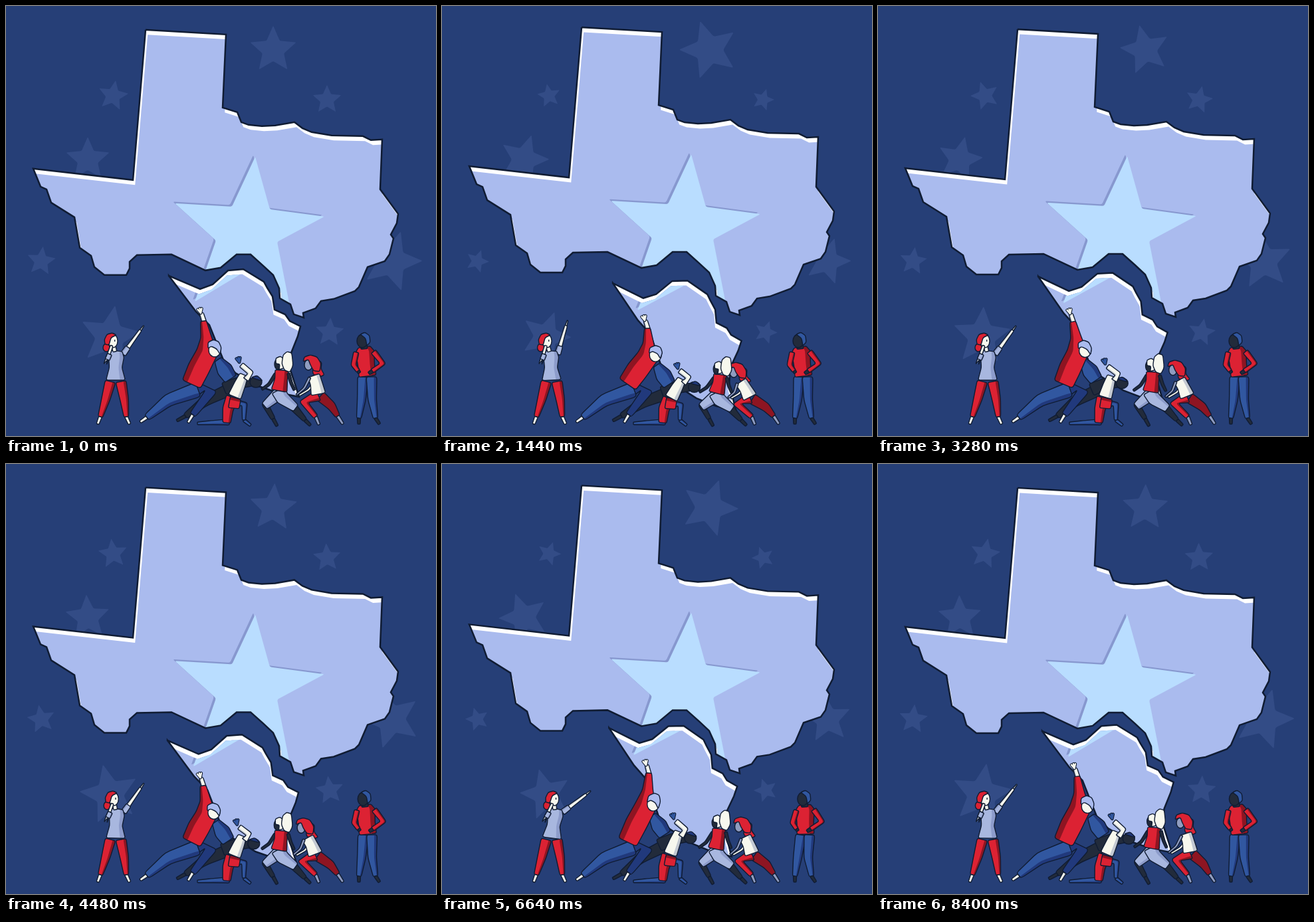
Animation, 647 px wide and 647 px high, one loop 8480 ms. Source, as an HTML page with a canvas:

```html
<!DOCTYPE html>
<html>
<head>
<meta charset="utf-8">
<style>
html, body { margin: 0; height: 100%; overflow: hidden; background: #263f77; }
canvas { display: block; width: 100vw; height: 100vh; }
</style>
</head>
<body>
<canvas id="stage" width="647" height="647"></canvas>
<script>
const g = document.getElementById('stage').getContext('2d');
const LOOP = 8480, STEP = 80, RAD = Math.PI / 180;
const INK = '#101c33', CREAM = '#f7f8ee', RED = '#dc2233', MAROON = '#8e1522', BLUE = '#3157a0',
  NAVY = '#21397c', DARK = '#222b3b', PALE = '#aabbee', SHIRT = '#a8b7df', GREY = '#8f9cc0';
const SHADE = { [RED]: MAROON, [BLUE]: NAVY, [CREAM]: '#c3c9d2', [SHIRT]: '#8d9ccb' };

// Key points of the heave: step, then the shift of the broken-off piece.
const HEAVE = [[0, 0, 0], [18, 12, 11], [41, -4, 1], [56, -2, 10], [74, 5, -1], [92, 7.5, -17], [105, 2, -4], [106, 0, 0]];

let phase, pulse, tilt, lean, wave, crouch, heaveX, heaveY;
function setTime(ms) {
  const n = Math.floor(ms % LOOP / STEP);
  const i = HEAVE.findIndex(k => k[0] > n), [a, b] = [HEAVE[i - 1], HEAVE[i]];
  const mix = (1 - Math.cos(Math.PI * (n - a[0]) / (b[0] - a[0]))) / 2;
  heaveX = a[1] + (b[1] - a[1]) * mix;
  heaveY = a[2] + (b[2] - a[2]) * mix;
  phase = 2 * Math.PI * n * STEP / LOOP;
  pulse = Math.sin(phase + .2) ** 2;
  tilt = Math.abs(Math.sin(phase));
  lean = Math.max(0, -Math.sin(phase));
  wave = (Math.sin(phase) + .7 * Math.sin(2 * phase)) / 1.5;
  crouch = Math.max(0, Math.min(1, tilt + heaveY / 20));
}

const cache = {};
const pts = s => cache[s] ||= s.split(' ').map(p => p.split(',').map(Number));

// Points of a figure shift with height: each row is [y, dx, dy], lowest first.
let rows = [];
function bend([x, y]) {
  let i = 0;
  while (i < rows.length - 2 && y < rows[i + 1][0]) i++;
  const [a, b] = [rows[i], rows[i + 1]];
  const u = Math.max(0, Math.min(1, (a[0] - y) / (a[0] - b[0])));
  return [x + a[1] + (b[1] - a[1]) * u, y + a[2] + (b[2] - a[2]) * u];
}
const bendFrom = (base, ...more) => rows = [[base, 0, 0], ...more];

// Closed path with corners rounded by the share cut of each side.
function outline(points, cut = 0) {
  const n = points.length;
  const toward = (p, q) => [p[0] + (q[0] - p[0]) * cut, p[1] + (q[1] - p[1]) * cut];
  g.beginPath();
  points.forEach((p, i) => {
    g.lineTo(...toward(p, points[(i + n - 1) % n]));
    g.quadraticCurveTo(...p, ...toward(p, points[(i + 1) % n]));
  });
  g.closePath();
}
function fill(color) {
  g.fillStyle = color;
  g.fill();
}
function ink(width = 1.4) {
  g.strokeStyle = INK;
  g.lineWidth = width;
  g.stroke();
}
function blob(color, s) {
  outline(pts(s).map(bend), .25);
  fill(color);
  ink();
}
function dot(color, x, y, rx, ry) {
  g.beginPath();
  g.ellipse(...bend([x, y]), rx, ry, 0, 0, 7);
  fill(color);
  ink();
}

// A chain of joints with a width at each, shaded along one side.
function chain(color, joints, widths) {
  const sides = joints.map((p, i) => {
    const [x0, y0] = joints[Math.max(0, i - 1)], [x1, y1] = joints[Math.min(joints.length - 1, i + 1)];
    const d = Math.hypot(x1 - x0, y1 - y0) || 1, r = widths[i] / 2 / d;
    return [(y1 - y0) * r, (x0 - x1) * r];
  });
  const edge = k => joints.map(([x, y], i) => [x + sides[i][0] * k, y + sides[i][1] * k]);
  const shape = [...edge(1), ...edge(-1).reverse()];
  outline(shape, .15);
  fill(color);
  if (SHADE[color]) {
    outline([...edge(1), ...edge(.45).reverse()], .15);
    fill(SHADE[color]);
  }
  outline(shape, .15);
  ink();
}
const body = (color, s, ...widths) => chain(color, pts(s).map(bend), widths);

function leg(color, skin, s, w) {
  const joints = pts(s).map(bend);
  chain(skin, joints.slice(2), [5, 4]);
  chain(color, joints.slice(0, 3), [w, w * .8, w * .45]);
}
function arm(sleeve, skin, s, w, reach = 2) {
  const [a, b, c] = pts(s).map(bend);
  chain(skin, [a, b, c], [w * .8, w * .7, w * .6]);
  if (reach > 1) chain(sleeve, [a, b, [c[0] * .75 + b[0] * .25, c[1] * .75 + b[1] * .25]], [w, w, w * .75]);
  else if (reach) chain(sleeve, [a, [(a[0] + b[0]) / 2, (a[1] + b[1]) / 2]], [w, w]);
}
function hand(color, x, y) {
  [x, y] = bend([x, y]);
  for (const [c, w] of [[INK, 4.6], [color, 2.4]]) {
    g.strokeStyle = c;
    g.lineWidth = w;
    g.beginPath();
    for (const a of [-40, -12, 12]) {
      g.moveTo(x, y);
      g.lineTo(x + 7 * Math.sin(a * RAD), y - 7 * Math.cos(a * RAD));
    }
    g.stroke();
  }
}

// Background stars: centre, size at rest, size at the pulse, swing phase.
const STARS = [
  [402, 66, 35, 45, 180], [161, 135, 23, 17, 150], [123, 231, 33, 38, 0], [483, 141, 22, 16, 0],
  [53, 384, 22, 17, 20], [580, 384, 46, 34, 60], [156, 497, 46, 37, 30], [487, 491, 22, 17, 10]
];
function sky() {
  g.fillStyle = '#263f77';
  g.fillRect(0, 0, 647, 647);
  for (const [x, y, rest, peak, start] of STARS) {
    const r = rest + (peak - rest) * pulse, turn = 20 * RAD * Math.sin(phase + start * RAD);
    outline(Array.from({ length: 10 }, (_, i) => {
      const a = turn + i * Math.PI / 5, d = i % 2 ? r * .48 : r * 1.03;
      return [x + d * Math.sin(a), y - d * Math.cos(a)];
    }), .08);
    fill('#334c86');
  }
}

const STATE = pts('210,36 331,43 326,153 348,160 354,175 365,179 385,181 405,180 434,175 446,184 460,190 490,195 537,196 549,202 566,201 563,276 590,313 588,327 579,344 583,350 577,374 570,384 544,393 531,423 525,429 493,441 474,444 466,455 447,462 448,469 433,464 428,449 412,440 411,425 402,405 387,391 368,374 347,374 323,394 300,398 249,374 197,375 186,385 186,395 181,405 148,405 133,393 128,376 111,364 103,318 68,296 61,276 52,272 41,245 191,262');
const SOUTH = pts('245,406 292,426 311,419 334,398 357,396 388,415 393,424 401,437 404,457 420,464 427,474 443,482 439,497 429,522 428,548 441,588 410,582 380,572 345,552 328,535 316,505 306,480 286,460');
const EMBLEM = pts('375,227 397,306 479,317 408,355 429,462 362,398 284,445 316,353 254,297 340,302');

function land(shape, lightX) {
  const shifted = (dx, dy, points, color, cut) => {
    g.translate(dx, dy);
    outline(points, cut);
    fill(color);
  };
  g.save();
  outline(shape);
  g.clip();
  shifted(0, 0, shape, '#fff');
  shifted(lightX, 7.5, shape, PALE);
  g.clip();
  shifted(-lightX - 3, -10, EMBLEM, '#8798cf', .03);
  shifted(3, 2.5, EMBLEM, '#b9ddff', .03);
  g.restore();
  outline(shape);
  ink(2.5);
}
function map() {
  g.lineJoin = 'miter';
  g.save();
  g.translate(0, -4.3 * pulse);
  land(STATE, 3.2);
  g.restore();
  g.save();
  g.translate(245 + heaveX, 406 + heaveY);
  g.rotate(3.6 * RAD * tilt);
  g.translate(-245, -406);
  land(SOUTH, -1.5);
  g.restore();
  g.lineJoin = 'round';
}

function pointer() {
  bendFrom(565, [505, 8 * lean - 3 * Math.max(0, wave), 0]);
  leg(RED, CREAM, '157,565 150,592 142,618 138,629', 16);
  leg(RED, CREAM, '173,565 178,592 181,618 186,629', 16);
  const [x, y] = bend([176, 524]), angle = (-54 - 20 * wave) * RAD;
  const along = d => [x + d * Math.cos(angle), y + d * Math.sin(angle)];
  chain(CREAM, [along(42), along(53)], [3, 1.5]);
  chain(CREAM, [along(0), along(26), along(45)], [7, 5, 4]);
  chain(SHIRT, [along(0), along(13)], [9, 8]);
  body(SHIRT, '167,519 166,528 165,544 165,563', 16, 23, 19, 29);
  dot(RED, 151, 514, 5, 6);
  body(CREAM, '161,508 164,520', 6, 6);
  dot(CREAM, 161, 504, 7, 10);
  blob(RED, '148,502 152,494 160,492 166,495 158,499 155,510 149,509');
  arm(SHIRT, CREAM, '156,524 149,540 159,511', 7, 1);
  const [ex, ey] = bend([163, 502]);
  g.fillStyle = INK;
  g.fillRect(ex, ey, 1.3, 3);
}

const followX = () => heaveX - 9 * tilt;

function lunger() {
  bendFrom(612, [560, followX(), heaveY * .6 + 2 * tilt]);
  leg(DARK, DARK, '345,573 300,594 270,617 257,624', 19);
  body(DARK, '372,566 350,567 328,576', 11, 17, 19);
  body(BLUE, '319,532 329,547 338,561', 12, 24, 20);
  dot(DARK, 376, 566, 9, 8);
  blob(NAVY, '369,559 378,556 386,564 378,562');
}

function lifter() {
  bendFrom(570, [518, heaveX * .6, heaveY * .65], [475, heaveX + 8 * lean, heaveY]);
  leg(NAVY, CREAM, '287,577 309,579 281,615 274,627', 22);
  leg(BLUE, CREAM, '289,577 244,593 212,619 202,626', 23);
  body(CREAM, '299,478 294,462', 7, 6);
  hand(CREAM, 293, 462);
  body(RED, '279,569 290,545 303,520 301,498 297,474', 30, 33, 32, 16, 9);
  dot(CREAM, 314, 518, 9, 10);
  blob(PALE, '304,515 304,506 312,502 320,505 324,514 322,524 317,516 309,512');
}

function kneeler() {
  bendFrom(605, [530, followX(), heaveY * .65 + 3 * tilt]);
  body(BLUE, '336,626 308,627 288,628', 9, 6, 4);
  leg(BLUE, BLUE, '347,598 359,599 358,623 368,631', 11);
  body(RED, '341,589 334,606 332,627', 20, 16, 12);
  body(RED, '336,596 352,599', 17, 14);
  body(CREAM, '358,555 352,569 344,588', 13, 17, 20);
  body(CREAM, '361,562 368,552 354,540', 9, 9, 8);
  hand(BLUE, 351, 536);
}

function backPusher() {
  bendFrom(620, [540, heaveX * .35, heaveY * .35 + 4 * tilt]);
  leg(DARK, DARK, '408,586 390,600 402,621 408,632', 14);
  leg(DARK, DARK, '415,586 433,604 450,623 458,631', 14);
  arm(RED, DARK, '406,553 396,569 385,577', 6, 0);
  body(SHIRT, '411,583 389,602', 19, 12);
  body(SHIRT, '410,578 416,590 436,605', 22, 20, 12);
  body(RED, '415,548 414,562 411,579', 20, 19, 24);
  arm(RED, DARK, '425,553 429,567 434,578', 6, 0);
  dot(DARK, 409, 539, 5, 8);
  blob(CREAM, '406,538 406,530 413,527 420,533 418,545 411,547 412,539');
  blob(CREAM, '417,525 423,520 430,522 432,541 427,551 419,548 415,538');
}

function redhead() {
  bendFrom(612, [545, -16 * crouch, 11 * crouch]);
  leg(MAROON, GREY, '473,587 490,602 499,617 507,629', 16);
  leg(RED, GREY, '470,586 448,596 466,618 471,630', 17);
  blob(RED, '464,529 475,536 474,546 479,555 470,559 461,553');
  arm(CREAM, CREAM, '468,560 456,577 441,586', 5, 0);
  body(CREAM, '463,556 467,568 470,584', 18, 18, 22);
  arm(CREAM, GREY, '457,559 449,575 437,585', 5, 0);
  dot(GREY, 455, 540, 6, 8);
  blob(RED, '447,535 449,528 458,525 468,528 474,538 472,550 463,549 458,540 455,532');
}

function watcher() {
  bendFrom(590, [515, 7 * lean, 0]);
  leg(BLUE, DARK, '537,558 535,592 531,620 531,629', 16);
  leg(BLUE, DARK, '550,558 551,592 556,620 562,629', 16);
  body(RED, '539,513 540,520 542,540 544,557', 18, 28, 25, 26);
  arm(RED, DARK, '527,521 523,540 532,552', 8);
  arm(RED, DARK, '553,520 567,538 546,553', 9);
  body(DARK, '538,506 539,516', 9, 10);
  dot(DARK, 536, 504, 8, 10);
  blob(BLUE, '533,494 540,491 547,496 548,506 543,511 541,500');
}

function draw(now) {
  setTime(now);
  g.lineCap = 'round';
  sky();
  map();
  for (const figure of [pointer, lunger, lifter, kneeler, redhead, backPusher, watcher]) figure();
  requestAnimationFrame(draw);
}
requestAnimationFrame(draw);
</script>
</body>
</html>
```
